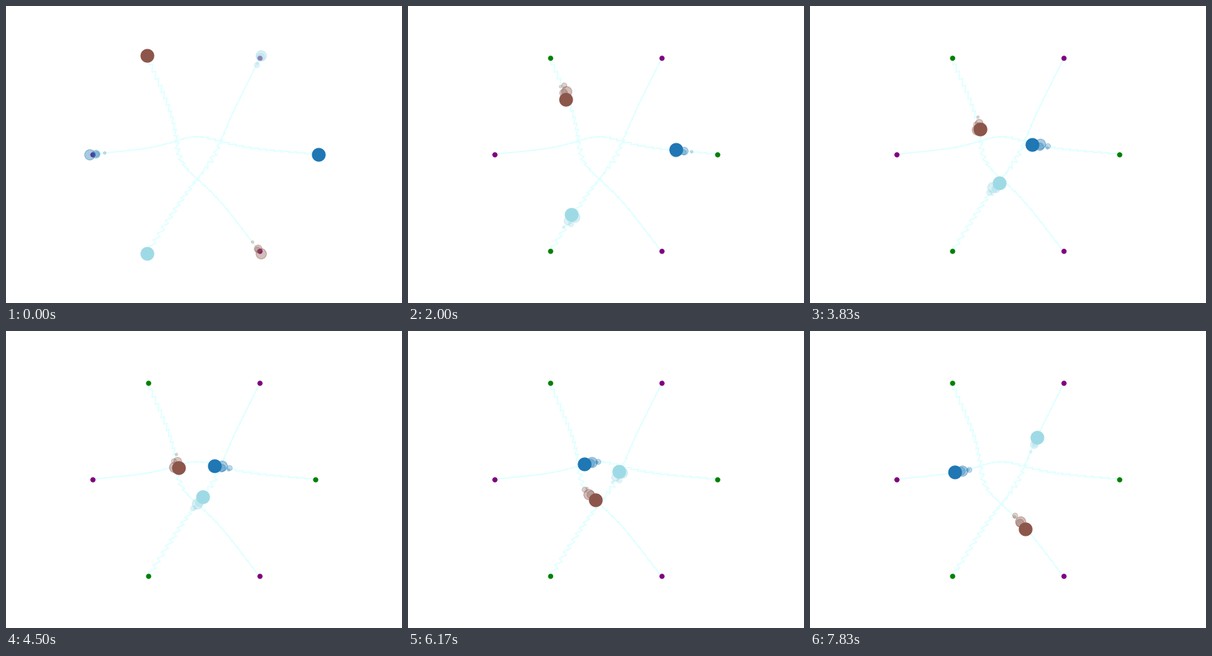
Animation, 640 px wide and 480 px high, one loop 8000 ms. Source, as a matplotlib script:

```python
import numpy as np
import matplotlib.pyplot as plt
from matplotlib.animation import FuncAnimation

W, H, DPI = 640, 480, 100
FRAMES, INTERVAL = 200, 40
STEPS_PER_FRAME = 6 * INTERVAL / 1000
LAST = 63                  # final step of each walk
MEET = 33                  # step at which the walkers pass each other
TRAIL = 4
CENTER = np.array([W / 2, H / 2])
DOT_RADIUS, WALK_RADIUS = 180, 184.7


def unit(deg):
    a = np.radians(deg)
    return np.stack([np.cos(a), np.sin(a)], axis=-1)


def walk(start, bow, pace, turn, shake):
    """Cross the circle from angle start, bowing aside near the middle.

    pace: sine terms that speed up or hold back the walker;
    turn: direction of the zigzag before and after the meeting.
    """
    k = np.arange(LAST + 1)
    u = k / LAST
    ahead, side = -unit(start), unit(start - 90)

    along = WALK_RADIUS * (2 * u - 1)
    for n, amp in enumerate(pace, 1):
        along = along + amp * np.sin(n * np.pi * u)
    aside = bow / (1 + ((k - MEET) / 12) ** 2) * (1 - (2 * u - 1) ** 6)
    course = CENTER + np.outer(along, ahead) + np.outer(aside, side)

    before, after = turn
    angle = before + (after - before) * (1 + np.tanh((k - 31) / 7)) / 2
    size = shake * np.tanh(np.minimum(k, LAST - k)) * (-1.0) ** k
    return course + size[:, None] * unit(angle)


fig = plt.figure(figsize=(W / DPI, H / DPI), dpi=DPI, facecolor="white")
ax = fig.add_axes([0, 0, 1, 1])
ax.set(xlim=(0, W), ylim=(H, 0))
ax.axis("off")

tab = plt.get_cmap("tab20")
paths = [
    (walk(0, 28.8, (1, 7, -2.5), (-15, -8), 3.6), tab(0)),
    (walk(240, 36.7, (-11, 6, 3), (114, 242), 3.9), tab(10)),
    (walk(120, 15.1, (-3, 4, 2.8), (180, -67), 4.2), tab(19)),
]

walkers = []
for path, color in paths:
    ax.plot(*path.T, color="lightcyan", lw=1.5, zorder=1)
    # newest spot first, each older one smaller and fainter
    spots = [
        ax.plot([], [], "o", color=color, ms=15 - 3 * n,
                alpha=0.45 - 0.06 * n if n else 1, zorder=5 - 0.1 * n)[0]
        for n in range(TRAIL + 1)
    ]
    walkers.append((path, spots))

for n in range(6):
    x, y = CENTER + DOT_RADIUS * unit(60 * n)
    ax.plot(x, y, "o", color="purple" if n % 2 else "green", ms=5, zorder=2)


def draw(i):
    k = int(i * STEPS_PER_FRAME + 0.2)
    shown = []
    for path, spots in walkers:
        for n, spot in enumerate(spots):
            x, y = path[k - n]      # wraps to the end of the walk
            spot.set_data([x], [y])
            shown.append(spot)
    return shown


anim = FuncAnimation(fig, draw, frames=FRAMES, interval=INTERVAL,
                     repeat=True, repeat_delay=0, blit=False)
plt.show()
```
